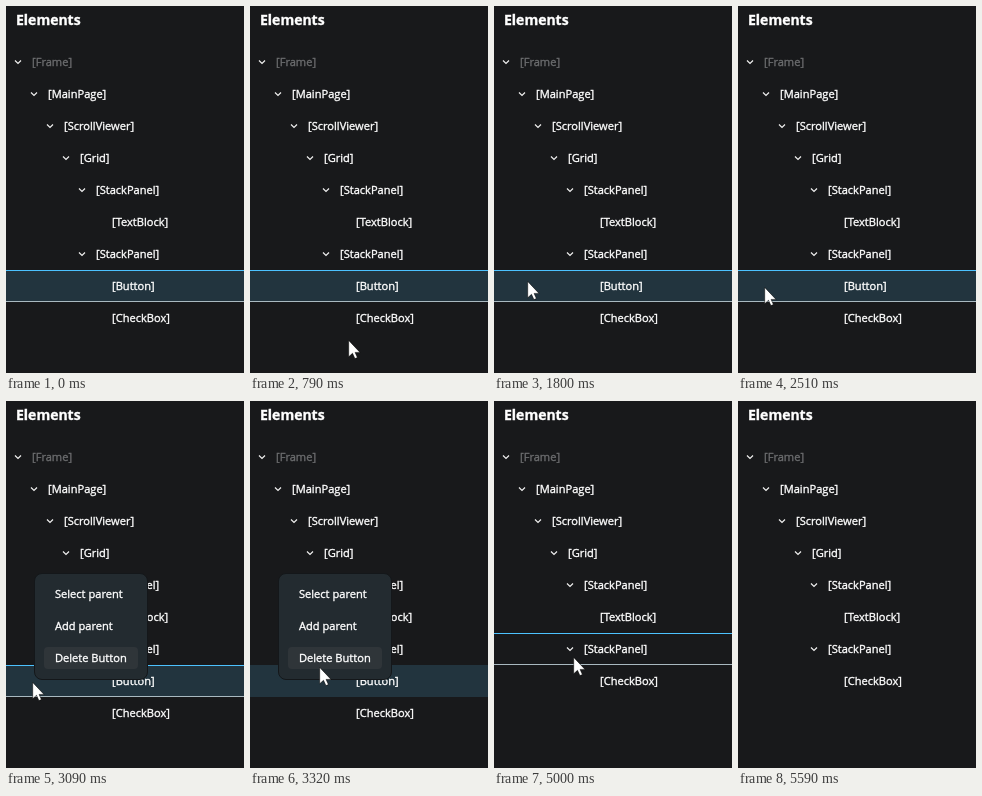
Animation, 238 px wide and 367 px high, one loop 6180 ms. Source, as an HTML page:

```html
<!DOCTYPE html>
<html lang="en">
<head>
<meta charset="utf-8">
<title>Element tree</title>
<style>
  html, body { margin: 0; width: 100%; height: 100%; overflow: hidden; background: #18191b; }
  svg { display: block; }
  text { font: 11.1px "Open Sans", "Noto Sans", sans-serif; fill: #fff; stroke: #fff; stroke-width: .35; }
  .title { font-size: 14px; font-weight: 700; }
  .muted { fill: #6b6c6e; stroke: #6b6c6e; }
  .chevron { fill: none; stroke: #f0f0f0; stroke-width: 1.2; }
</style>
</head>
<body>
<svg width="238" height="367" viewBox="0 0 238 367">
  <rect width="238" height="367" fill="#18191b"/>
  <rect id="selection" y="264" width="238" height="32" fill="#22343e"/>
  <g id="hover">
    <rect width="238" height="1" fill="#4cc2ff"/>
    <rect y="31" width="238" height="1" fill="#a9b9c0"/>
  </g>
  <text class="title" x="10" y="19">Elements</text>
  <g id="tree"></g>
  <g id="menu">
    <rect x="28.5" y="172.5" width="113" height="106" rx="7.5" fill="#232b30" stroke="#14171a"/>
    <rect x="38" y="246" width="94" height="22" rx="4" fill="#2f3539"/>
    <text x="49" y="197">Select parent</text>
    <text x="49" y="229">Add parent</text>
    <text x="49" y="261">Delete Button</text>
  </g>
  <path id="cursor" d="M.7 .4V16.8L4.5 13.3L6.9 18.6L9.4 17.6L7.1 12.4H12Z"
        fill="#fff" stroke="#000" stroke-width=".5"/>
  <circle id="click" r="12" fill="#ff0" fill-opacity=".47"/>
</svg>
<script>
const LOOP = 6180;
const ROW = 32;
const $ = id => document.getElementById(id);
const show = (node, on) => node.setAttribute('display', on ? 'inline' : 'none');
const place = (node, x, y) => node.setAttribute('transform', `translate(${x} ${y})`);

// Label, depth, expandable
const items = [
  ['Frame', 0, true], ['MainPage', 1, true], ['ScrollViewer', 2, true],
  ['Grid', 3, true], ['StackPanel', 4, true], ['TextBlock', 5, false],
  ['StackPanel', 4, true], ['Button', 5, false], ['CheckBox', 5, false]
];

const rows = items.map(([label, depth, expandable], i) => {
  const g = document.createElementNS('http://www.w3.org/2000/svg', 'g');
  const x = depth * 16;
  g.innerHTML =
    (expandable ? `<path class="chevron" d="M${x + 9} 54.5l3 3l3 -3"/>` : '') +
    `<text x="${x + 26}" y="60"${depth ? '' : ' class="muted"'}>[${label}]</text>`;
  place(g, 0, i * ROW);
  $('tree').append(g);
  return g;
});
const [buttonRow, checkRow] = rows.slice(-2);

const smooth = p => p * p * (3 - 2 * p);
const easeOut = p => 1 - (1 - p) ** 2;
const easeIn = p => p * p;

// Time, x, y, easing towards this point
const path = [
  [630, 112, 366], [1230, 82, 297, easeOut], [1260, 82, 297],
  [1800, 33, 275, smooth], [1880, 33, 275], [1990, 26, 281, smooth],
  [3090, 26, 281], [3320, 69, 266, smooth], [3420, 69, 266],
  [3540, 78, 259, smooth], [4860, 78, 259], [5000, 79, 256, smooth],
  [5230, 79, 256], [5590, 98, 368, easeIn]
];

function cursorAt(t) {
  const i = path.findIndex(point => point[0] > t);
  if (i < 1) return null;
  const [t0, x0, y0] = path[i - 1];
  const [t1, x1, y1, ease = p => p] = path[i];
  const p = ease((t - t0) / (t1 - t0));
  return { x: x0 + (x1 - x0) * p, y: y0 + (y1 - y0) * p };
}

function hoverTop(t, y) {
  if (t < 1260) return y < 328 ? 296 : 264;
  if (t < 3115) return y > 296 ? 296 : 264;
  if (t < 4860) return null;
  return y < 264 ? 232 : y < 296 ? 264 : null;
}

function render(t) {
  const cursor = cursorAt(t);
  const top = hoverTop(t, cursor ? cursor.y : 367);
  const deleted = t >= 4070;
  const rightClick = t >= 2340 && t < 2510;
  const leftClick = t >= 3850 && t < 3990;

  show($('selection'), !deleted);
  show(buttonRow, !deleted);
  place(checkRow, 0, (deleted ? 7 : 8) * ROW);

  show($('hover'), top !== null);
  if (top !== null) place($('hover'), 0, top);

  show($('menu'), t >= 2530 && t < 3990);
  show($('cursor'), cursor);
  show($('click'), rightClick || leftClick);
  if (cursor) {
    const x = Math.round(cursor.x), y = Math.round(cursor.y);
    place($('cursor'), x, y);
    place($('click'), x, y);
  }
}

const start = performance.now();
function tick() {
  render((performance.now() - start) % LOOP);
  requestAnimationFrame(tick);
}
render(0);
requestAnimationFrame(tick);
</script>
</body>
</html>
```
